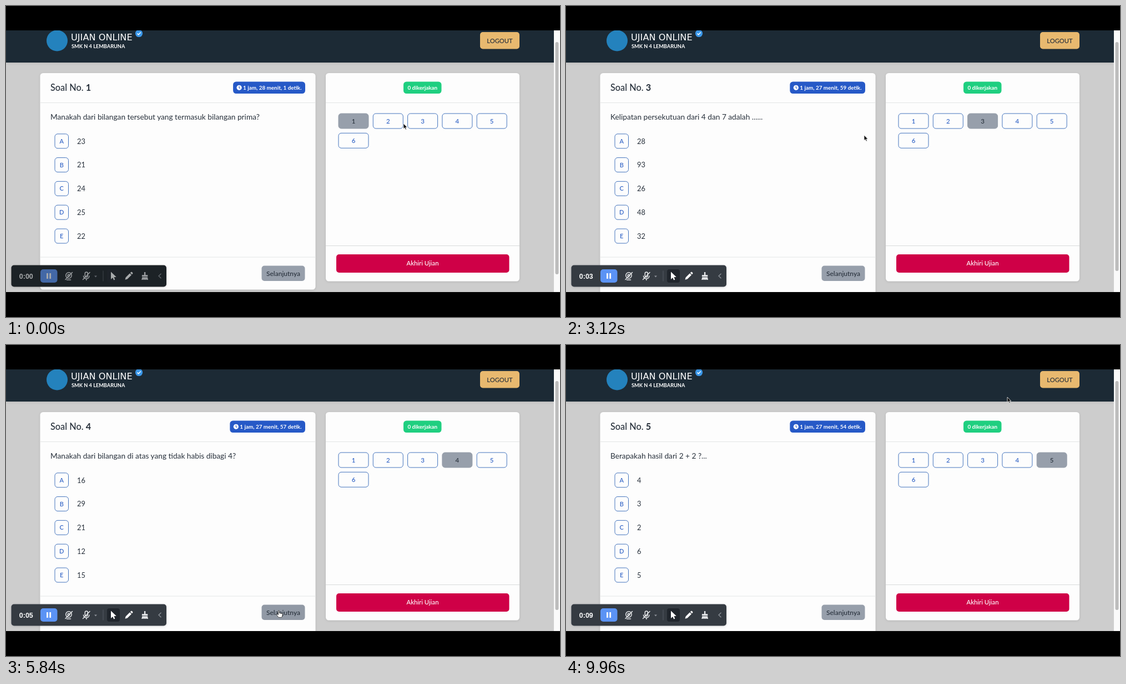
These frames come from a looping animation (998x561 px, 10000 ms). An HTML page:

```html
<!DOCTYPE html>
<html lang="id">
<head>
<meta charset="utf-8">
<title>Ujian Online</title>
<style>
  html, body { margin: 0; width: 100%; height: 100%; overflow: hidden; background: #000; }
  svg { display: block; width: 998px; height: 561px; }
  text { font-family: Lato, "Open Sans", sans-serif; white-space: pre; fill: #27303b; }
  .mid { text-anchor: middle; }
  .medium { font-weight: 500; }
  .bold { font-weight: 700; }
  .white { fill: #fff; }
  .blue { fill: #2b5fc4; }
  .box { fill: #fdfdfd; stroke: #4474bd; }
  .on .box { fill: #979fab; stroke: #979fab; }
  .on text { fill: #27303b; }
  .rule { stroke: #e4e6e6; }
  .icon { fill: none; stroke: #e6e8ea; stroke-width: 1.5; stroke-linecap: round; stroke-linejoin: round; }
</style>
</head>
<body>
<svg id="stage" viewBox="0 0 998 561" xmlns="http://www.w3.org/2000/svg">
  <defs>
    <clipPath id="view"><rect y="44" width="998" height="472"/></clipPath>
    <filter id="soft" x="-10%" y="-10%" width="120%" height="120%">
      <feDropShadow dx="0" dy="1" stdDeviation="2" flood-opacity=".12"/>
    </filter>
  </defs>
  <rect width="998" height="561"/>
  <g clip-path="url(#view)">
    <rect y="44" width="998" height="472" fill="#cdcdcd"/>
    <rect y="44" width="987" height="58" fill="#1d2934" filter="url(#soft)"/>
    <rect x="987" y="44" width="11" height="472" fill="#fafafa"/>
    <rect id="thumb" x="989.5" y="65" width="6" rx="3" fill="#bcbcbc"/>

    <circle cx="92" cy="62.5" r="19" fill="#2482bd"/>
    <text x="117" y="62" class="white" style="font:16.2px 'DejaVu Sans',sans-serif">UJIAN ONLINE</text>
    <text x="118" y="76.3" class="white bold" font-size="9.2">SMK N 4 LEMBARUNA</text>
    <circle cx="239.5" cy="49.5" r="6.6" fill="#3b97e8"/>
    <path d="M236.5 49.6l2.2 2.2 4-4.2" fill="none" stroke="#fff" stroke-width="1.5"/>
    <rect x="854" y="47" width="71" height="30.5" rx="5" fill="#e8b96f"/>
    <text x="889.5" y="66.5" class="mid medium" font-size="11.2">LOGOUT</text>

    <g filter="url(#soft)" fill="#fdfdfd">
      <rect id="card" x="61.5" y="121" width="496" rx="5.5"/>
      <rect x="576" y="121" width="349" height="375.5" rx="5.5"/>
    </g>
    <path class="rule" d="M61.5 174.5h496M61.5 453h496M576 174.5h349"/>
    <path d="M576 432.5h349" stroke="#d9dbdb"/>

    <text x="80" y="152.5" class="medium" font-size="16.3">Soal No. <tspan id="num" class="bold"></tspan></text>
    <rect id="badge" y="136.5" height="21.5" rx="5.5" fill="#2659c7"/>
    <g id="clock">
      <circle r="4.6" fill="#fff"/>
      <path d="M0-2.7V.2l1.8 1.3" fill="none" stroke="#2659c7" stroke-width="1.1"/>
    </g>
    <text id="left" x="532.5" y="150.8" class="white bold" font-size="9.9" text-anchor="end"></text>
    <text id="ask" x="80" y="204.6" font-size="13.7"></text>
    <g id="answers"></g>

    <rect id="next" x="460.5" y="468.5" width="78" height="27.5" rx="5" fill="#979fab"/>
    <text x="499.5" y="486.5" class="mid medium" font-size="12">Selanjutnya</text>

    <rect x="716" y="136.5" width="68.5" height="21.5" rx="5.5" fill="#1fcf80"/>
    <text x="750.3" y="150.8" class="mid white bold" font-size="9.9">0 dikerjakan</text>
    <g id="nav"></g>
    <rect x="595" y="448" width="311.5" height="33" rx="5" fill="#cf0047"/>
    <text x="750.5" y="468.4" class="mid white medium" font-size="11.3">Akhiri Ujian</text>

    <rect id="bar" x="9.5" y="467.5" width="279.5" height="39" rx="5" fill="#343a43" filter="url(#soft)"/>
    <g id="tools">
      <text id="rec" x="23.8" y="491.6" class="white" style="font:bold 12.5px 'Liberation Sans',Arial,sans-serif"></text>
      <rect x="62" y="475" width="30.5" height="24" rx="5" fill="#5b93f5"/>
      <path d="M74.5 482v10M79.7 482v10" stroke="#fff" stroke-width="2.8"/>
      <g class="icon">
        <circle cx="113" cy="486" r="5.2"/><circle cx="113" cy="486" r="1.8"/>
        <path d="M109.5 494h7M107 493.5L119.5 480.5"/>
        <rect x="142.3" y="480" width="5" height="9" rx="2.5"/>
        <path d="M139.5 487c0 6.500 10.500 6.500 10.500 0M144.800 492v2.500M138.500 493.500L151 480.500"/>
      </g>
      <path d="M159 486.500h5l-2.500 3z" fill="#8d9299"/>
      <path d="M175 477.500v19" stroke="#545a63"/>
      <rect x="182" y="475" width="23" height="24" rx="4" fill="#20252c"/>
      <path d="M189 479.500v13.500l3.200-2.900 2 4.400 2.200-1-2-4.300 4.300-.4z" fill="#fff"/>
      <path d="M214.500 493.800l1.200-4.300 7.300-7.300 3 3-7.300 7.300zM223.900 481.300l1.300-1.300c1.500-1 4 1.500 3 3l-1.300 1.300z" fill="#fff"/>
      <path d="M248.900 480h2.400v5.200h4v3h-10.400v-3h4zM245.300 489.200h9.700l1 4.800h-2.500l-.5-2-.4 2h-2l-.5-2-.5 2h-2l-.4-2-.6 2h-2.400z" fill="#e6e8ea"/>
      <path d="M279.500 482.800l-4.500 4.200 4.500 4.200" fill="none" stroke="#8d9299" stroke-width="1.300"/>
    </g>

    <g id="cursor" stroke-linejoin="round">
      <path id="arrow" d="M0 0v9.600l2.200-2 1.500 3.500 1.700-.7-1.500-3.400h3z" fill="#111" stroke="#f4f4f4" stroke-width=".8"/>
      <path id="hand" d="M-1 .6c0-1.300 2-1.300 2 0v3.600l4.600 1c1 .3 1.400 1 1.200 2L6 10.600c-.2.900-.7 1.400-1.600 1.400H.5c-.7 0-1.100-.3-1.600-.9L-4 7.400c-.6-1 .5-1.800 1.400-1.200L-1 7.300z" fill="#fff" stroke="#333" stroke-width=".9"/>
    </g>
  </g>
</svg>
<script>
const LOOP = 10000;
const $ = id => document.getElementById(id);

// start time, question, answers A to E
const questions = [
  [0, 'Manakah dari bilangan tersebut yang termasuk bilangan prima?', '23 21 24 25 22'],
  [900, 'Berapakah hasil dari 2 x 5 ?...', '11 35 15 10 46'],
  [2650, 'Kelipatan persekutuan dari 4 dan 7 adalah ......', '28 93 26 48 32'],
  [4600, 'Manakah dari bilangan di atas yang tidak habis dibagi 4?', '16 29 21 12 15'],
  [6400, 'Berapakah hasil dari 2 + 2 ?...', '4 3 2 6 5']
];

// times at which the countdown loses one second
const ticks = [900, 1900, 3650, 5600, 7400, 8400, 9400];

// time, x, y of the pointer tip
const path = [
  [0, 716, 212], [350, 692, 209], [1100, 690, 210], [1720, 654, 220],
  [2200, 500, 480], [2600, 499, 480], [3120, 537, 233], [3900, 502, 478],
  [4500, 497, 481], [5200, 497, 481], [6100, 490, 479], [6800, 490, 479],
  [7800, 836, 43.5], [8300, 838, 46], [9300, 795, 94], [LOOP, 795, 94]
];

const navBox = i => [599 + i % 5 * 62.3, 194 + Math.floor(i / 5) * 35.3, 54, 27];
const hotspots = [[460.5, 468.5, 78, 27.5], [854, 47, 71, 30.5]];
for (let i = 0; i < 6; i++) hotspots.push(navBox(i));

const button = ([x, y, w, h], label, size) =>
  `<rect class="box" x="${x}" y="${y}" width="${w}" height="${h}" rx="5"/>
   <text class="mid medium blue" x="${x + w / 2}" y="${y + h / 2 + 4}" font-size="${size}">${label}</text>`;

$('nav').innerHTML = [0, 1, 2, 3, 4, 5]
  .map(i => `<g>${button(navBox(i), i + 1, 11.5)}</g>`).join('');

$('answers').innerHTML = [...'ABCDE'].map((c, i) => {
  const y = 230.8 + i * 42.8;
  return button([88, y, 24.5, 26], c, 11) +
    `<text class="answer" x="128" y="${y + 17.8}" font-size="12.8"></text>`;
}).join('');
const answers = document.querySelectorAll('.answer');

function showQuestion(n) {
  const [, ask, list] = questions[n];
  $('num').textContent = n + 1;
  $('ask').textContent = ask;
  list.split(' ').forEach((a, i) => answers[i].textContent = a);
  [...$('nav').children].forEach((g, i) => g.classList.toggle('on', i === n));
  $('card').setAttribute('height', n ? 420 : 390.5);
  $('thumb').setAttribute('height', n ? 413 : 419);
}

function showTime(lost) {
  const rest = 88 * 60 + 1 - lost;
  $('left').textContent = `1 jam, ${Math.floor(rest / 60) % 60} menit, ${rest % 60} detik.`;
  const x = 532.5 - $('left').getComputedTextLength() - 18;
  $('badge').setAttribute('x', x);
  $('badge').setAttribute('width', 539 - x);
  $('clock').setAttribute('transform', `translate(${x + 11} 147.3)`);
}

function pointerAt(t) {
  const i = Math.max(1, path.findIndex(p => p[0] > t));
  const [t0, x0, y0] = path[i - 1], [t1, x1, y1] = path[i];
  const u = (t - t0) / (t1 - t0), k = u * u * (3 - 2 * u);
  return [x0 + (x1 - x0) * k, y0 + (y1 - y0) * k];
}

const inside = (px, py) => ([x, y, w, h]) =>
  px >= x && px <= x + w + .3 && py >= y && py <= y + h;

let shownQ = -1, shownLost = -1;
function draw(t) {
  const q = questions.filter(r => r[0] <= t).length - 1;
  const lost = ticks.filter(s => s <= t).length;
  if (q !== shownQ) showQuestion(shownQ = q);
  if (lost !== shownLost) showTime(shownLost = lost);
  $('rec').textContent = '0:0' + Math.floor(t / 1000);

  const fade = Math.min(1, t / 400);
  $('tools').setAttribute('opacity', .62 + .38 * fade);
  $('bar').setAttribute('fill', `rgb(${31 + 21 * fade},${34 + 24 * fade},${38 + 29 * fade})`);

  const [x, y] = pointerAt(t);
  const over = hotspots.some(inside(x, y));
  $('cursor').setAttribute('transform', `translate(${x} ${y})`);
  $('hand').style.display = over ? '' : 'none';
  $('arrow').style.display = over ? 'none' : '';
  $('next').setAttribute('fill', inside(x, y)(hotspots[0]) ? '#9199a5' : '#979fab');
}

const start = performance.now();
function loop() {
  draw((performance.now() - start) % LOOP);
  requestAnimationFrame(loop);
}
loop();
</script>
</body>
</html>
```
